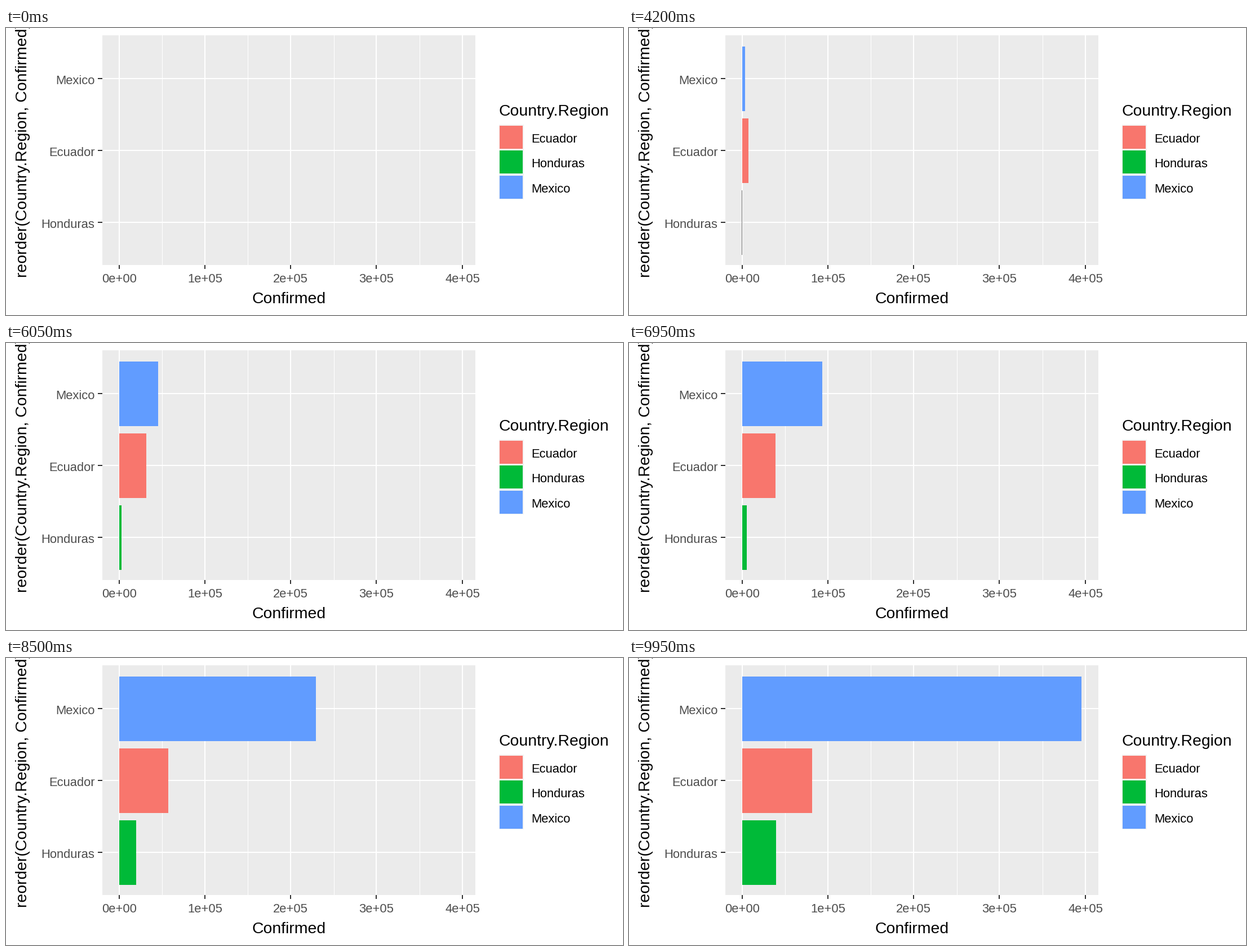
Animation of 1095 by 511 pixels, one loop 10 s. Source, as a matplotlib script:

```python
import numpy as np
import matplotlib.pyplot as plt
from matplotlib.animation import FuncAnimation
from matplotlib.patches import Rectangle

W, H, DPI = 1095, 511, 64
FRAMES, INTERVAL = 200, 50
LAST_DAY = 187

plt.rcParams["font.family"] = "Liberation Sans"

RED, GREEN, BLUE = "#F8766D", "#00BA38", "#619CFF"
THIN_GREEN = "#737373"
PANEL, TICK, AXIS_TEXT = "#EBEBEB", "#333333", "#4D4D4D"
SMALL, LARGE = 22, 28.4

ZERO, PER_CASE = 200.9, 0.0015222
STEP = 152.17
LEFT, TOP, RIGHT, BOTTOM = 171, 13, 833, 422
ROWS = {"Mexico": 90, "Ecuador": 218, "Honduras": 346}

fig = plt.figure(figsize=(W / DPI, H / DPI), dpi=DPI, facecolor="white")
ax = fig.add_axes([0, 0, 1, 1])
ax.set_xlim(0, W)
ax.set_ylim(H, 0)
ax.axis("off")


def box(x0, y0, x1, y1, color, z=1, smooth=False):
    patch = Rectangle((x0, y0), x1 - x0, y1 - y0, facecolor=color,
                      linewidth=0, antialiased=smooth, zorder=z)
    return ax.add_patch(patch)


def label(x, y, text, size, color="black", ha="left", rotation=0):
    ax.text(x, y, text, fontsize=size * 72 / DPI, color=color, ha=ha,
            va="baseline", rotation=rotation, rotation_mode="anchor")


def draw_panel():
    box(LEFT, TOP, RIGHT, BOTTOM, PANEL)
    for k in range(4):
        x = int(ZERO + 0.75 + (k + 0.5) * STEP)
        box(x, TOP, x + 1, BOTTOM, "white", 2)
    for name, y in ROWS.items():
        box(LEFT, y - 1, RIGHT, y + 1, "white", 2)
        box(163, y - 1, LEFT, y + 1, TICK, 2)
        label(157.5, y + 9.5, name, SMALL, AXIS_TEXT, "right")
    for k in range(5):
        x = round(ZERO + k * STEP)
        box(x - 1, TOP, x + 1, BOTTOM, "white", 2)
        box(x - 1, BOTTOM, x + 1, BOTTOM + 7, TICK, 2)
        label(x, 453, f"{k}e+{'05' if k else '00'}", SMALL, AXIS_TEXT, "center")
    label(502, 490, "Confirmed", LARGE, ha="center")
    label(36.7, 217.5, "reorder(Country.Region, Confirmed)", LARGE,
          ha="center", rotation=90)


def draw_legend():
    label(874.5, 155.5, "Country.Region", LARGE)
    box(874.5, 172.3, 918.5, 305.3, "#F2F2F2", 1, True)
    keys = (("Ecuador", RED), ("Honduras", GREEN), ("Mexico", BLUE))
    for i, (name, color) in enumerate(keys):
        y = 173.9 + 44.5 * i
        box(875.7, y, 917.2, y + 40.7, color, 2, True)
        label(932, 204 + 44.5 * i, name, SMALL)


def smooth_curve(x, xs, ys):
    """Cubic Hermite curve through a few points."""
    slopes = np.gradient(ys, xs)
    i = np.clip(np.searchsorted(xs, x, side="right") - 1, 0, len(xs) - 2)
    gap = xs[i + 1] - xs[i]
    t = np.clip((x - xs[i]) / gap, 0, 1)
    return (ys[i] * (1 + 2 * t) * (1 - t) ** 2
            + slopes[i] * gap * t * (1 - t) ** 2
            + ys[i + 1] * t ** 2 * (3 - 2 * t)
            - slopes[i + 1] * gap * t ** 2 * (1 - t))


def per_frame(points, curve):
    """Cases for every frame, each day being pinned to its nearest frame."""
    xs, ys = np.array(points, dtype=float).T
    days = np.arange(LAST_DAY + 1)
    pins = np.round(days * (FRAMES - 1) / LAST_DAY)
    return np.interp(np.arange(FRAMES), pins, curve(days, xs, ys))


def make_bar(name, color, points, curve):
    y = ROWS[name]
    bar = box(0, y - 57.3, 0, y + 57.5, color, 3, True)
    return bar, per_frame(points, curve), color


draw_panel()
draw_legend()

# Key points are (day, cases); only Ecuador's reports come with sudden jumps.
bars = [
    make_bar("Mexico", BLUE, [
        (57, 160), (70, 1400), (87, 7500), (107, 31500), (131, 93400),
        (150, 175200), (169, 282300), (187, 395500)], smooth_curve),
    make_bar("Ecuador", RED, [
        (57, 200), (58, 370), (78, 5000), (79, 7200), (92, 11200),
        (93, 22700), (100, 26300), (103, 31900), (105, 31900), (107, 28800),
        (131, 39100), (150, 49700), (169, 64200), (187, 81200)], np.interp),
    make_bar("Honduras", GREEN, [
        (57, 10), (79, 390), (107, 1770), (131, 5360), (150, 12300),
        (166, 24900), (187, 39700)], smooth_curve),
]


def update(frame):
    for bar, cases, color in bars:
        width = cases[frame] * PER_CASE
        end = round(ZERO + width)
        start = min(201, end - 1)
        bar.set_visible(width > 0.5)
        bar.set_x(start)
        bar.set_width(end - start)
        thin = color == GREEN and end - start == 1
        bar.set_facecolor(THIN_GREEN if thin else color)
    return [bar for bar, _, _ in bars]


anim = FuncAnimation(fig, update, frames=FRAMES, interval=INTERVAL,
                     repeat=True, repeat_delay=0, blit=False)
plt.show()
```
